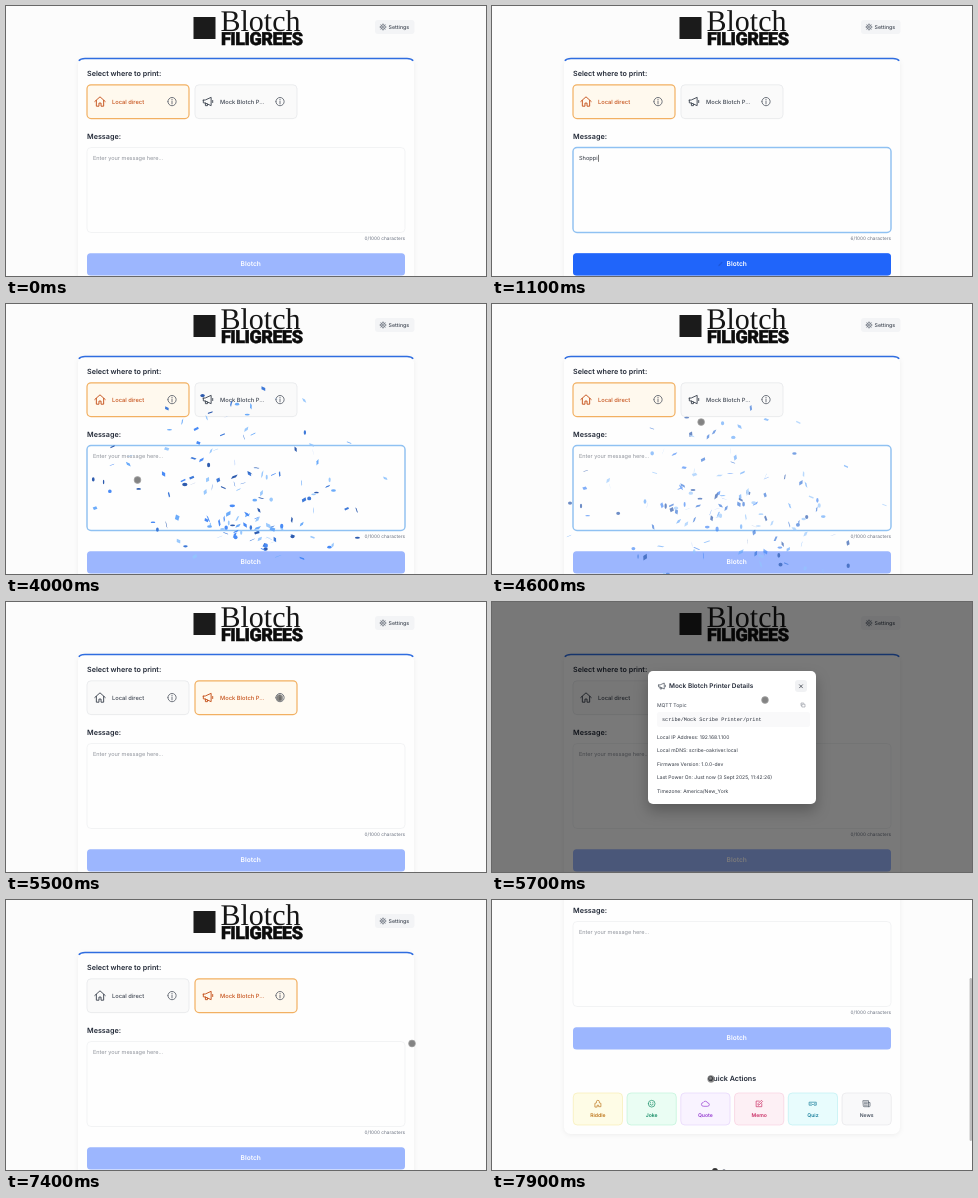
An HTML page that plays this animation: 480 by 270 pixels, repeating every 8000 ms.

```html
<!DOCTYPE html>
<html lang="en">
<head>
<meta charset="utf-8">
<title>Message printer</title>
<style>
html, body { margin: 0; width: 100%; height: 100%; overflow: hidden; background: #fcfcfc; }
svg { display: block; width: 100%; height: 100%; }
text { font-family: Inter, sans-serif; text-rendering: geometricPrecision; white-space: pre; }
.serif { font-family: "Liberation Serif", serif; }
.heavy { font-family: Roboto, sans-serif; font-weight: 900; letter-spacing: -.5px; }
.mono { font-family: "Liberation Mono", monospace; }
.shade { filter: drop-shadow(0 1.5px 2.5px rgba(0, 0, 0, .06)); }
.lift { filter: drop-shadow(0 7px 7px rgba(0, 0, 0, .25)); }
</style>
</head>
<body>
<svg id="stage" viewBox="0 0 480 270"></svg>
<script>
const LOOP = 8000;
const NOTE = "Shopping list\n\nBananas\nCookies\nKittie snacks";
const SUBMIT = 3400, BURST = 3500, PICK = 5000, SCROLL = 120;

const ring = (x, y, r) => `M${x - r} ${y}a${r} ${r} 0 1 0 ${2 * r} 0a${r} ${r} 0 1 0 ${-2 * r} 0`;
const spokes = [...Array(8).keys()].map(i => {
  const c = Math.cos(i * Math.PI / 4), s = Math.sin(i * Math.PI / 4);
  return `M${12 + 7 * c} ${12 + 7 * s}L${12 + 10 * c} ${12 + 10 * s}`;
}).join("");

// Line icons on a 24 unit grid
const ICONS = {
  home: "M2 12L12 3L22 12M5 10V21H10V15H14V21H19V10",
  horn: "M3 9.5V14.5L7 15L18 20V4L7 9L3 9.5ZM21 10V14M7 15V20H11V17",
  info: ring(12, 12, 9) + "M12 11V17M12 7V8",
  gear: ring(12, 12, 7.5) + ring(12, 12, 3) + spokes,
  copy: "M9 9H20V20H9ZM5 15H4V4H15V5",
  check: "M4 13L9 18L20 6",
  cross: "M6 6L18 18M18 6L6 18",
  pen: "M5 19L8 12L18 4L19 6L12 15L5 19",
  puzzle: "M4 20V11L8 10V7A4 4 0 0 1 16 7V10L20 11V20H14V16H10V20Z",
  smile: ring(12, 12, 9) + "M8 14Q12 19 16 14M9 9V10M15 9V10",
  cloud: "M7 19A5 5 0 0 1 6 9A6.5 6.5 0 0 1 18 10A4.5 4.5 0 0 1 18 19Z",
  edit: "M12 5H4V20H19V12M9 15V12L18 3L21 6L12 15Z",
  quiz: "M3 8H21V16H15L12 13L9 16H3ZM7 11V13M17 11V13",
  news: "M3 4H17V20H5Q3 20 3 18ZM17 9H21V18Q21 20 19 20H17M6 8H14M6 12H14M6 16H14"
};

const icon = (name, x, y, size, color, attrs = "") =>
  `<path d="${ICONS[name]}" transform="translate(${x - size / 2} ${y - size / 2}) scale(${size / 24})"
    fill="none" stroke="${color}" stroke-width="1.8" stroke-linecap="round" stroke-linejoin="round" ${attrs}/>`;
const text = (s, x, y, size, color, weight = 400, attrs = "") =>
  `<text x="${x}" y="${y}" font-size="${size}" fill="${color}" font-weight="${weight}" ${attrs}>${s}</text>`;
const rect = (x, y, w, h, r, fill, attrs = "") =>
  `<rect x="${x}" y="${y}" width="${w}" height="${h}" rx="${r}" fill="${fill}" ${attrs}/>`;
const mid = 'text-anchor="middle"';

function option(id, x, name, label) {
  const look = (on, fill, edge, ink) =>
    `<g id="${id}${on}">` +
    rect(x, 78.8, 102, 33.8, 4, fill, `stroke="${edge}" stroke-width="${on ? 1.2 : .7}"`) +
    icon(name, x + 13, 95.5, 12.5, ink) +
    text(label, x + 25, 97.6, 5.75, ink, 500) + `</g>`;
  return look(0, "#fafafa", "#e4e5e8", "#3f4652") + look(1, "#fff9ee", "#f2b062", "#c6511a") +
    icon("info", x + 85, 95.6, 11, "#555b66");
}

const TILES = [
  ["Riddle", "puzzle", "#fefce6", "#f6edb4", "#bd7418"],
  ["Joke", "smile", "#eafdf3", "#bff2d9", "#0f8a62"],
  ["Quote", "cloud", "#f9f3ff", "#e6d5fb", "#9237cf"],
  ["Memo", "edit", "#fdf0f5", "#f8d0e0", "#c92a62"],
  ["Quiz", "quiz", "#e8fcfd", "#bdf0f3", "#187f9c"],
  ["News", "news", "#f9f9fa", "#e7e7ea", "#4b5563"]
];
const tile = ([label, name, fill, edge, ink], i) => {
  const x = 81.3 + i * 53.75, c = x + 24.6;
  return rect(x, 313, 49.2, 32, 4, fill, `stroke="${edge}" stroke-width=".7"`) +
    icon(name, c, 323.7, 9, ink) + text(label, c, 337, 5.1, ink, 600, mid);
};

const page =
  rect(187.5, 11, 22, 22, 0, "#1b1b1b") +
  text("Blotch", 214.5, 25, 30, "#161616", 400, 'class="serif"') +
  text("FILIGREES", 215, 39, 18, "#0c0c0c", 900, 'class="heavy" stroke="#0c0c0c" stroke-width=".5"') +
  rect(369, 14, 39.5, 14, 3, "#f3f4f6") +
  icon("gear", 377, 21, 7.5, "#4b5563") +
  text("Settings", 382.6, 22.9, 5.25, "#3f4652", 500) +
  rect(72, 52, 336, 302, 7, "#fefefe", 'class="shade"') +
  `<path d="M72.8 54.8Q74.5 52.5 79 52.5H401Q405.5 52.5 407.2 54.8" fill="none" stroke="#2f6de0" stroke-width="1.5"/>` +
  text("Select where to print:", 81, 70, 7.2, "#222937", 600) +
  option("local", 81, "home", "Local direct") +
  option("mock", 189, "horn", "Mock Blotch P...") +
  text("Message:", 81, 132.7, 7.2, "#222937", 600) +
  rect(81, 141.5, 318, 85, 4, "#fefefe", 'stroke="#eeeff1" stroke-width=".7"') +
  rect(81, 141.5, 318, 85, 4, "none", 'id="focus" stroke="#8fc1f2" stroke-width="1.4"') +
  text("Enter your message here...", 87, 154.2, 5.55, "#92969e", 400, 'id="hint"') +
  [0, 1, 2, 3, 4].map(i => text("", 87, 154.2 + i * 9, 5.65, "#2b313c", 400, `id="line${i}"`)).join("") +
  `<path id="spell" d="M87.3 191.6H101" stroke="#e66" stroke-width=".6" stroke-dasharray=".8 .8"/>` +
  rect(0, 0, .6, 7, 0, "#222", 'id="caret"') +
  text("", 399, 233.6, 4.72, "#6b7280", 400, 'id="count" text-anchor="end"') +
  rect(81, 247.2, 318, 22.2, 3.5, "#9cb6fe") +
  rect(81, 247.2, 318, 22.2, 3.5, "#2065fa", 'id="active"') +
  icon("pen", 228.5, 258, 5.5, "#1740a8", 'id="pen"') +
  text("Blotch", 244.7, 260.4, 6.6, "#fff", 600, mid) +
  text("Quick Actions", 240, 301, 7.2, "#222937", 600, mid) +
  TILES.map(tile).join("") +
  `<circle cx="223" cy="391" r="3" fill="#333"/>` +
  text("Open source", 230, 393.2, 5.2, "#6b7280", 500);

const facts = ["Local IP Address: 192.168.1.100", "Local mDNS: scribe-oakriver.local",
  "Firmware Version: 1.0.0-dev", "Last Power On: Just now (3 Sept 2025, 11:42:26)",
  "Timezone: America/New_York"];
const modal =
  rect(156, 69, 168, 133, 5, "#fff", 'class="lift"') +
  icon("horn", 170, 84, 9, "#3f4652") +
  text("Mock Blotch Printer Details", 177, 86.3, 6.45, "#222937", 600) +
  rect(303, 78, 12, 12, 3, "#f1f2f4") + icon("cross", 309, 84.3, 6, "#333943", 'style="stroke-width:3"') +
  text("MQTT Topic", 165, 105, 5.1, "#3f4652") +
  icon("copy", 311, 103, 6, "#6b7280", 'id="copy"') + icon("check", 311, 103, 6, "#16a34a", 'id="done"') +
  rect(165, 110, 153, 15, 2.5, "#f9f9fa") +
  text("scribe/Mock Scribe Printer/print", 170, 119.2, 5.2, "#2b313c", 400, 'class="mono"') +
  facts.map((s, i) => text(s, 165, 136.9 + i * 13.5, 5.03, "#323843")).join("");

document.getElementById("stage").innerHTML =
  rect(0, 0, 480, 270, 0, "#fcfcfc") + `<g id="page">${page}</g>` +
  rect(0, 0, 480, 270, 0, "#000", 'id="dim"') + `<g id="modal">${modal}</g>` +
  rect(477.6, 0, 2.4, 163, 1.2, "#bdbdbd", 'id="bar"') + `<g id="confetti"></g>` +
  `<circle id="cursor" r="3.4" fill="#404040" fill-opacity=".65" stroke="#a5a5a5" stroke-width=".7"/>`;

const el = {};
document.querySelectorAll("[id]").forEach(e => el[e.id] = e);
const set = (id, key, v) => el[id].setAttribute(key, v);
const fade = (id, v) => set(id, "opacity", +v);

const clamp = v => Math.max(0, Math.min(1, v));
const ramp = (t, a, b) => { const u = clamp((t - a) / (b - a)); return u * u * (3 - 2 * u); };

let seed = 77;
function rand() {
  seed = seed + 0x6D2B79F5 | 0;
  let r = Math.imul(seed ^ seed >>> 15, 1 | seed);
  r = r + Math.imul(r ^ r >>> 7, 61 | r) ^ r;
  return ((r ^ r >>> 14) >>> 0) / 4294967296;
}

// Bursts: count, spread in degrees, speed, decay, size, delay in ticks
const BURSTS = [[20, 40, 52, .9, 1, 0], [22, 90, 45, .9, 1, 0], [40, 130, 45, .91, .9, 0],
  [14, 130, 25, .92, 1.2, 0], [14, 140, 45, .9, 1, 0], [34, 110, 34, .9, 1, 25]];
const BLUES = ["#1e4fa8", "#2f6fd6", "#3b82f6", "#60a5fa", "#93c5fd"];
const LIFE = 110, ZOOM = .28;
const bits = BURSTS.flatMap(([n, spread, speed, decay, size, delay]) => Array.from({ length: n }, () => {
  const path = document.createElementNS("http://www.w3.org/2000/svg", "path");
  path.setAttribute("fill", BLUES[Math.floor(rand() * BLUES.length)]);
  el.confetti.append(path);
  return {
    path, decay, delay, size: size * .48,
    angle: (-90 + (rand() - .5) * spread) * Math.PI / 180,
    v: speed * (.5 + rand()), wobble: rand() * 10, rate: Math.min(.11, rand() * .1 + .05),
    tilt: (rand() * .5 + .25) * Math.PI, depth: rand() + 2, round: rand() < .25
  };
}));

function drawBit(b, tick) {
  const k = tick - b.delay;
  if (k < 0) return b.path.setAttribute("d", "");
  const dist = b.v * (1 - b.decay ** k) / (1 - b.decay);
  const x = 240 + Math.cos(b.angle) * dist * ZOOM;
  const y = 258 + (Math.sin(b.angle) * dist + 3 * k) * ZOOM;
  const w = b.wobble + b.rate * k, a = b.tilt + .1 * k, s = b.size;
  const wx = 10 * s * Math.cos(w), wy = 10 * s * Math.sin(w);
  const tx = b.depth * 1.6 * s * Math.cos(a), ty = b.depth * 1.6 * s * Math.sin(a);
  const rx = Math.abs(wx) * .4 + .6, ry = Math.abs(wy) * .4 + .6;
  b.path.setAttribute("d", b.round
    ? `M${x - rx} ${y}a${rx} ${ry} 0 1 0 ${2 * rx} 0a${rx} ${ry} 0 1 0 ${-2 * rx} 0`
    : `M${x} ${y}L${x + wx} ${y + ty}L${x + wx + tx} ${y + wy + ty}L${x + tx} ${y + wy}Z`);
}

const MOVES = [[200, 150, 240], [450, 131.5, 176], [4200, 131.5, 176], [4800, 236, 98], [5100, 236, 98],
  [5450, 273.5, 96], [5600, 273.5, 96], [5700, 273, 98], [6000, 273, 98], [6150, 311, 103], [6600, 311, 103],
  [6900, 318, 122], [7050, 318, 122], [7180, 406, 143.5], [7400, 406, 143.5], [7700, 219, 179], [8000, 219, 179]];
function pointer(t) {
  const i = Math.max(1, MOVES.findIndex(m => m[0] > t));
  const [t0, x0, y0] = MOVES[i - 1], [t1, x1, y1] = MOVES[i];
  const u = ramp(t, t0, t1);
  return [x0 + (x1 - x0) * u, y0 + (y1 - y0) * u];
}

function typed(t) {
  if (t < 800 || t >= SUBMIT) return 0;
  if (t < 1700) return Math.min(13, 1 + Math.floor((t - 800) * 12 / 700 + .01));
  return Math.min(44, 15 + Math.floor((t - 1700) * 29 / 900 + .01));
}

function draw(t) {
  const n = typed(t), lines = NOTE.slice(0, n).split("\n");
  for (let i = 0; i < 5; i++) el["line" + i].textContent = lines[i] || "";
  el.count.textContent = `${n}/1000 characters`;
  fade("hint", n === 0);
  fade("spell", n >= 38 ? .5 : 0);
  fade("focus", ramp(t, 350, 500) - ramp(t, PICK - 50, PICK + 100));
  fade("caret", t >= 400 && t < SUBMIT && !(t >= 2900 && t < 3100));
  const row = lines.length - 1;
  set("caret", "x", 87.4 + (lines[row] ? el["line" + row].getComputedTextLength() : 0));
  set("caret", "y", 148.8 + row * 9);

  const live = ramp(t, 760, 960) - ramp(t, SUBMIT, SUBMIT + 200);
  fade("active", live);
  fade("pen", live * .7);

  const mock = t >= PICK;
  fade("local0", mock); fade("local1", !mock);
  fade("mock0", !mock); fade("mock1", mock);

  const shown = ramp(t, 5550, 5690) - ramp(t, 7080, 7190), zoom = .95 + .05 * shown;
  fade("dim", .52 * (ramp(t, 5540, 5690) - ramp(t, 7110, 7400)));
  fade("modal", shown);
  set("modal", "transform", `translate(240 135.5) scale(${zoom}) translate(-240 -135.5)`);
  const copied = t >= 6300 && t < 6800;
  fade("copy", !copied); fade("done", copied);

  const scroll = SCROLL * ramp(t, 7450, 7900);
  set("page", "transform", `translate(0 ${-scroll})`);
  set("bar", "y", scroll * .65);
  fade("bar", ramp(t, 7450, 7550));

  const k = (t - BURST) * .06, flying = k >= 0 && k < LIFE;
  fade("confetti", flying ? 1 - (k / LIFE) ** 2 : 0);
  if (flying) bits.forEach(b => drawBit(b, k));

  const [x, y] = pointer(t);
  set("cursor", "cx", x); set("cursor", "cy", y);
  fade("cursor", (t >= 200 && t < 800) || t >= 3900);
}

const start = performance.now();
function tick() {
  draw((performance.now() - start) % LOOP);
  requestAnimationFrame(tick);
}
tick();
</script>
</body>
</html>
```
